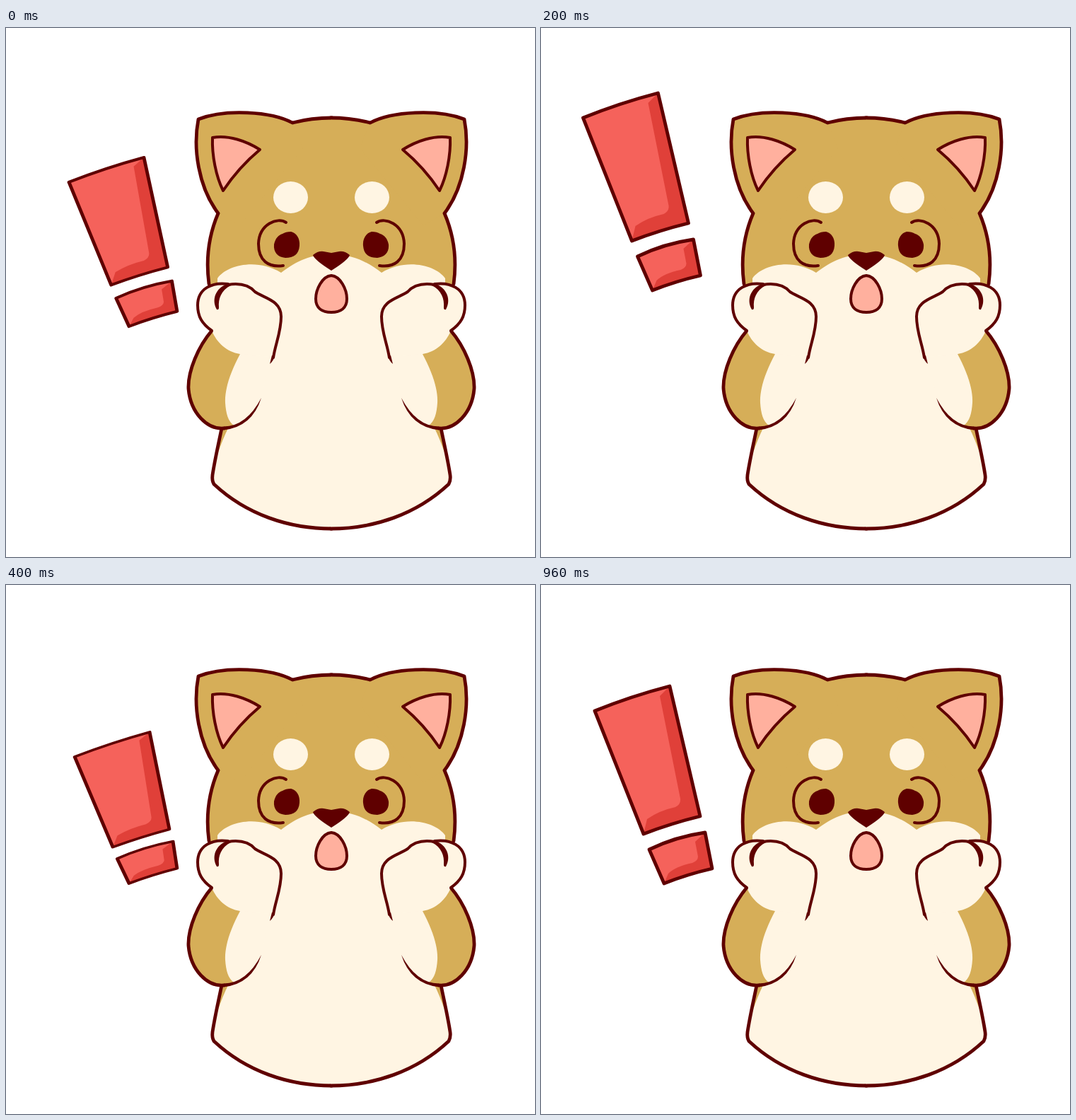
Animation, 748 px wide and 748 px high, one loop 1.2 s. Source, as an HTML page:

```html
<!DOCTYPE html>
<html lang="en">
<head>
<meta charset="utf-8">
<title>Surprised dog</title>
<style>
  html, body { margin: 0; width: 100%; height: 100%; overflow: hidden; background: #fff; }
  svg { display: block; width: 100%; height: 100%; }
  .line { fill: none; stroke: #5f0000; stroke-width: 4; stroke-linecap: round; stroke-linejoin: round; }
  .bold { stroke-width: 4.8; }
  .tan { fill: #d6ae58; }
  .cream { fill: #fff5e3; }
  .pink { fill: #ffb09e; }
  .dark { fill: #5f0000; }
  .red { fill: #f5625b; }
  .shade { fill: #e04039; }
</style>
</head>
<body>
<svg viewBox="0 0 748 748">
  <defs>
    <g id="ear">
      <path class="tan" d="M405 134C375 118 310 114 272 129C264 170 272 225 300 262L330 280L420 170Z"/>
      <path class="line bold" d="M405 134C375 118 310 114 272 129C264 170 272 225 300 262"/>
      <path class="line pink" d="M292 155C315 151 340 160 359 172C341 187 323 206 307 230C297 210 291 180 292 155Z"/>
    </g>

    <g id="headHalf">
      <path class="tan" d="M461 127Q432 127 405 134L300 262C288 290 282 325 287 362L290 400H461Z"/>
      <path class="line bold" d="M461 127Q432 127 405 134M300 262C288 290 282 325 287 362"/>
    </g>

    <g id="bodyHalf">
      <path class="cream" d="M461 320C425 320 405 334 389 346C355 325 312 335 299 354V420L330 560L305 566C300 590 295 612 292 632Q291 640 294 645C340 688 400 708 461 708Z"/>
      <path class="tan" d="M304 566H314Q307 580 300 600Z"/>
      <path class="line bold" d="M305 566C300 590 295 612 292 632Q291 640 294 645C340 688 400 708 461 708"/>

      <!-- arm -->
      <path class="cream" d="M291 428C272 450 257 485 258 510C261 545 285 568 308 566C330 566 350 545 360 525L389 400Z"/>
      <path class="tan" d="M291 428C272 450 257 485 258 510C261 545 285 568 308 566L322 562C314 556 311 545 310 530C309 510 318 485 331 461C312 458 298 445 291 428Z"/>
      <path class="line bold" d="M291 428C272 450 257 485 258 510C261 545 285 568 308 566"/>
      <path class="dark" d="M308 563.6Q340 563 361 523Q348 564 308 568.4Z"/>

      <!-- paw -->
      <path class="cream" d="M314 361C295 358 271 366 271 392C271 408 276 417 291 428L331 461L376 465C380 450 389 430 389 408C388 385 365 382 352 373C340 358 325 360 314 361Z"/>
      <path class="line" d="M314 362C292 359 271 368 271 392C271 408 277 418 291 428"/>
      <path class="line" d="M314 363C333 360 344 364 352 373C365 382 389 385 389 408C389 430 381 446 378 466"/>
      <path class="dark" d="M317 361C299 364 289 382 298 398Q301 399 301 395C300 383 304 371 318 364Z"/>
      <path class="dark" d="M376 463L380 464Q378 471 373 475Z"/>

      <!-- eye and brow -->
      <ellipse class="cream" cx="402.5" cy="239.5" rx="24.5" ry="22.5"/>
      <path class="line" d="M396 275C384 267 358 277 357 305C357 329 371 339 392 336"/>
      <path class="dark" d="M403 288C411 290 416 298 415 308C414 320 407 325 395 325C384 324 378 317 379 306C381 297 385 293 391 291C394 289 398 288 403 288Z"/>
    </g>
  </defs>

  <use href="#headHalf"/>
  <use href="#headHalf" transform="matrix(-1 0 0 1 920 0)"/>
  <use href="#ear" id="leftEar"/>
  <g transform="matrix(-1 0 0 1 920 0)"><use href="#ear" id="rightEar"/></g>
  <use href="#bodyHalf"/>
  <use href="#bodyHalf" transform="matrix(-1 0 0 1 920 0)"/>

  <path class="dark" d="M434 321Q441 315 449 316L460 318L471 316Q479 315 486 321Q484 328 460 343Q436 328 434 321Z"/>
  <path class="line pink" d="M460 350C473 351 482 370 482 383C482 396 473 402 460 402C447 402 438 396 438 383C438 370 447 351 460 350Z"/>

  <g id="mark">
    <path class="shade" d="M76 178Q128 157 182 143L225 327Q184 337 145 352Z"/>
    <path class="red" d="M76 178Q128 157 182 143L168 157L197 302Q198 310 190 314Q167 319 150 331L145 352Z"/>
    <path class="line bold" d="M76 178Q128 157 182 143L225 327Q184 337 145 352Z"/>
    <path class="shade" d="M153 374Q190 356 232 350L242 401Q207 409 174 422Z"/>
    <path class="red" d="M153 374Q190 356 232 350L218 363L222 384Q222 390 214 393Q190 398 180 408L174 422Z"/>
    <path class="line bold" d="M153 374Q190 356 232 350L242 401Q207 409 174 422Z"/>
  </g>
</svg>
<script>
  const STEP = 100, LOOP = 1200;
  const SQUASH = [0.84, 0.74, 1, 1, 0.74, 1, 1];
  const HOP_STEP = 2, DROOP_STEP = 5;
  const setTransform = (id, value) =>
    document.getElementById(id).setAttribute('transform', value);

  // Shears the ear by (dx, dy) per unit of distance from its fixed base line.
  function earMatrix(dx, dy) {
    const nx = -0.773, ny = -0.634, offset = 398;
    return `matrix(${[1 + dx * nx, dy * nx, dx * ny, 1 + dy * ny, dx * offset, dy * offset]})`;
  }

  function draw(time) {
    const step = Math.min(SQUASH.length - 1, Math.floor(time % LOOP / STEP));
    const hop = step === HOP_STEP ? '-16.5 -51' : '0 0';
    const droop = step === DROOP_STEP ? 1 : 0;
    setTransform('mark', `translate(${hop}) translate(174 422) rotate(-18) ` +
      `scale(1 ${SQUASH[step]}) rotate(18) translate(-174 -422)`);
    setTransform('leftEar', earMatrix(-0.053 * droop, 0.1 * droop));
    setTransform('rightEar', earMatrix(-0.04 * droop, 0.088 * droop));
  }

  const start = performance.now();
  function tick() {
    draw(performance.now() - start);
    requestAnimationFrame(tick);
  }
  tick();
</script>
</body>
</html>
```
